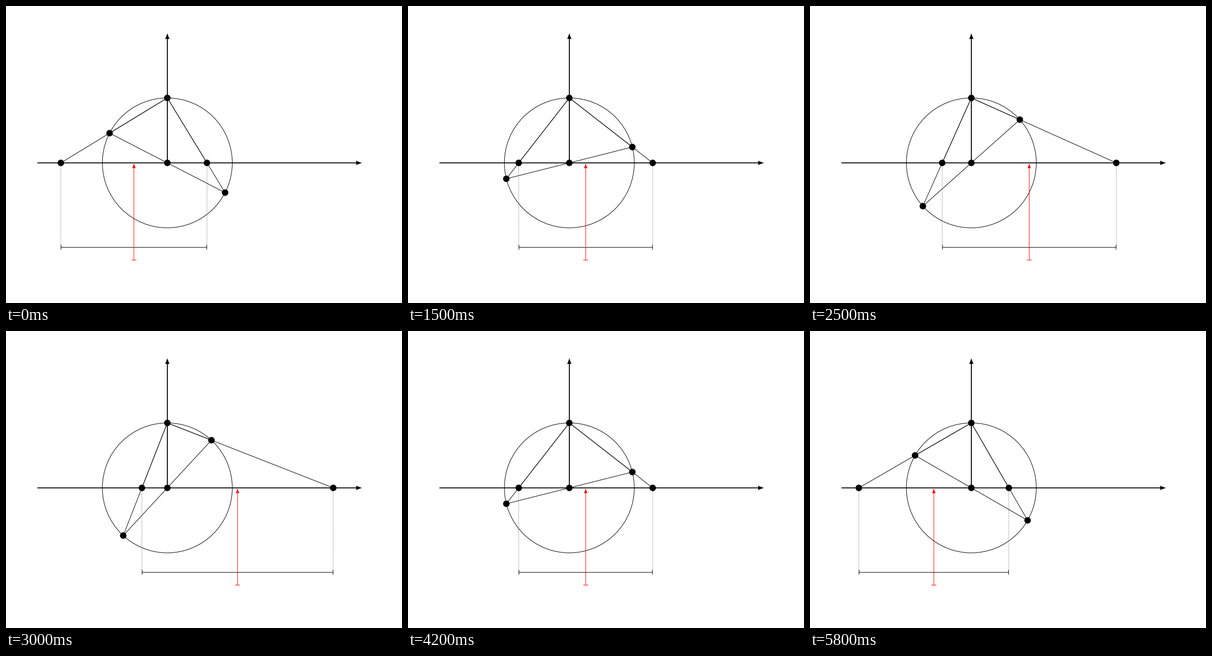
These frames come from a looping animation (864x648 px, 5900 ms). A matplotlib script:

```python
import numpy as np
import matplotlib.pyplot as plt
from matplotlib.animation import FuncAnimation
from matplotlib.patches import Circle, PathPatch
from matplotlib.path import Path

W, H = 864, 648
CM = 72 / 2.54 * 2.5          # one drawing centimetre in pixels
OX, OY = 352.0, 342.3         # origin on the stage, y pointing down
R = 2 * CM
BAR_Y = OY + 2.6 * CM
FOOT_Y = OY + 3 * CM
TIP_Y = OY + 1
THIN, THICK = 1.1, 2.0
CAP = 5.3
STEPS = 29
FRAMES = 2 * STEPS + 1

fig = plt.figure(figsize=(W / 72, H / 72), dpi=72, facecolor="white")
ax = fig.add_axes([0, 0, 1, 1])
ax.set_xlim(0, W)
ax.set_ylim(H, 0)
ax.axis("off")


def line(xs=(), ys=(), width=THIN, color="black", z=2, **style):
    item, = ax.plot(xs, ys, color=color, lw=width, zorder=z, snap=False,
                    solid_capstyle="butt", **style)
    return item


def dot(x=OX, y=OY):
    return ax.add_patch(Circle((x, y), 0.1 * CM, fc="black", lw=0, zorder=5))


def head_path(x, y, angle, unit):
    """Curved arrow tip pointing along angle (screen radians)."""
    pts = np.array([(0, 0), (-2.667, 0.5), (-7, 2), (-10, 3.75),
                    (-10, -3.75), (-7, -2), (-2.667, -0.5), (0, 0)]) * unit
    c, s = np.cos(angle), np.sin(angle)
    pts = pts @ np.array([(c, s), (-s, c)]) + (x, y)
    codes = [Path.MOVETO] + [Path.CURVE4] * 3 + [Path.LINETO] + [Path.CURVE4] * 3
    return Path(pts, codes)


def head(x, y, angle, unit, color="black", z=2):
    patch = PathPatch(head_path(x, y, angle, unit), fc=color, lw=0, zorder=z)
    return ax.add_patch(patch)


# Fixed parts
X_END, Y_END = OX + 6 * CM, OY - 4 * CM
line([OX - 4 * CM, X_END - 8], [OY, OY], THICK)
line([OX, OX], [OY, Y_END + 8], THICK)
head(X_END, OY, 0, 1.295)
head(OX, Y_END, -np.pi / 2, 1.295)
ax.add_patch(Circle((OX, OY), R, fill=False, ec="black", lw=THIN, zorder=2))
dot()
dot(OX, OY - R)

# Moving parts
chord = line()
rays = [line() for _ in range(4)]
drops = [line(width=1, ls=(0, (1, 2.49))) for _ in range(2)]
bar = line()
caps = [line() for _ in range(2)]
rim_dots = [dot() for _ in range(2)]
axis_dots = [dot() for _ in range(2)]
shaft = line(color="red", z=6)
foot = line(color="red", z=6)
RED_UNIT = 1.04
red_head = head(OX, TIP_Y, -np.pi / 2, RED_UNIT, "red", 6)


def angle_at(i):
    if i < STEPS:
        deg = -30 + 80 * (i + 1) / STEPS
    else:
        deg = 50 - 80 * (i - STEPS) / STEPS
    return np.radians(deg)


def update(i):
    t = angle_at(i)
    dx, dy = R * np.cos(t), R * np.sin(t)
    rim = [(OX - dx, OY + dy), (OX + dx, OY - dy)]
    left = OX - R * np.cos(t) / (1 + np.sin(t))
    right = OX + R * np.cos(t) / (1 - np.sin(t))
    mid = (left + right) / 2

    chord.set_data(*zip(*rim))
    for ray, (x, y) in zip(rays, rim + [(left, OY), (right, OY)]):
        ray.set_data([OX, x], [OY - R, y])
    for d, p in zip(rim_dots, rim):
        d.center = p
    for d, drop, x in zip(axis_dots, drops, (left, right)):
        d.center = (x, OY)
        drop.set_data([x, x], [OY, BAR_Y])

    bar.set_data([left, right], [BAR_Y, BAR_Y])
    for cap, x in zip(caps, (left + THIN / 2, right - THIN / 2)):
        cap.set_data([x, x], [BAR_Y - CAP, BAR_Y + CAP])

    shaft.set_data([mid, mid], [FOOT_Y, TIP_Y + 8])
    y = FOOT_Y - THIN / 2
    foot.set_data([mid - CAP, mid + CAP], [y, y])
    red_head.set_path(head_path(mid, TIP_Y, -np.pi / 2, RED_UNIT))
    return [chord, *rays, *drops, bar, *caps, *rim_dots, *axis_dots,
            shaft, foot, red_head]


anim = FuncAnimation(fig, update, frames=FRAMES, interval=100,
                     repeat=True, repeat_delay=0, blit=False)
plt.show()
```
